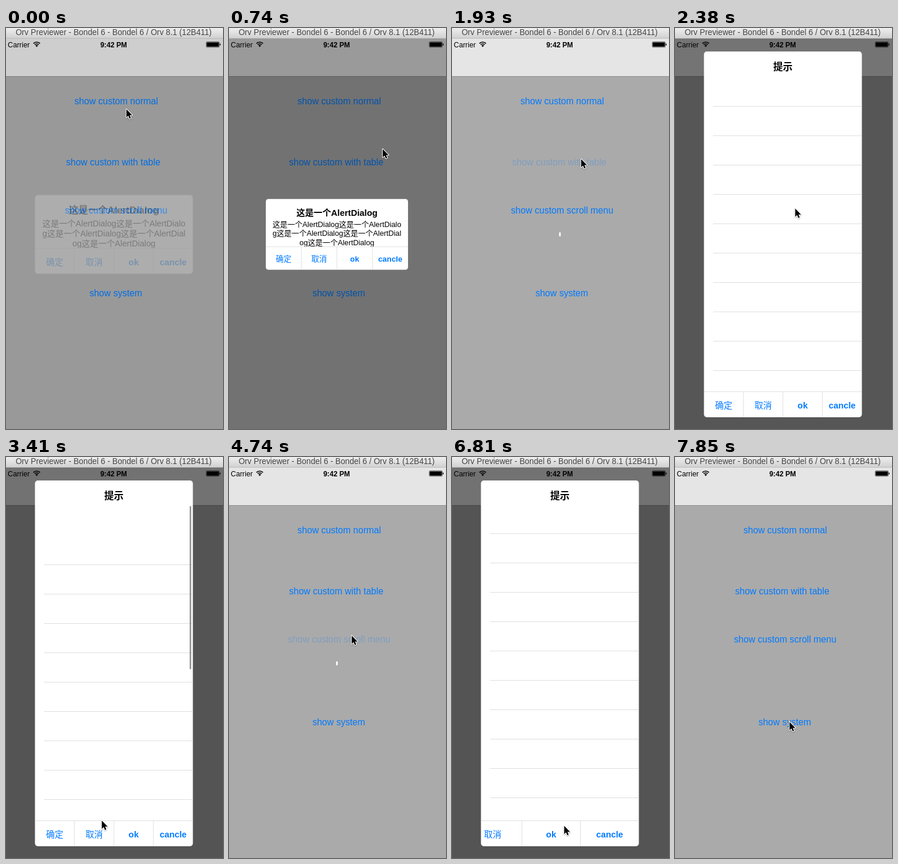
Recreate the animation shown at these times as an HTML page with a canvas. Size 371x683 px, loop 8 s.

```html
<!DOCTYPE html>
<html lang="en">
<head>
<meta charset="utf-8">
<title>Alert dialogs</title>
<style>
  html, body { margin: 0; width: 100%; height: 100%; overflow: hidden; background: #aaa; }
  canvas { display: block; }
</style>
</head>
<body>
<canvas id="stage" width="371" height="683"></canvas>
<script>
const W = 371, H = 683, BAR = 18;
const stage = document.getElementById('stage');
const sheet = Object.assign(document.createElement('canvas'), { width: W, height: H });
const screen2d = stage.getContext('2d'), sheet2d = sheet.getContext('2d');
let ctx = screen2d;

const LOOP = 8000, STEP = LOOP / 54;
const POP = 400, DIM_IN = 450, FADE = 300;
const FONT = '"Liberation Sans", "Noto Sans CJK SC", "Noto Sans CJK", "Noto Sans CJK JP", sans-serif';
const BLUE = '#007aff', LINE = '#dfdfe1';
const CX = 184.5, CY = 351.5, WIDE = 270, ROW = 50, MENU = 43.5;

const buttons = [
  ['show custom normal', 188.5, 130],
  ['show custom with table', 183.3, 234],
  ['show custom scroll menu', 188.3, 316],
  ['show system', 187.7, 457]
];

// scroll: eased [time, offset] keys of the table
const dialogs = [
  { button: 0, open: -2000, close: -240 },
  { button: 0, open: 444, close: 1180 },
  { button: 1, open: 1925, close: 3600, scroll: [[2400, 0], [2800, 180], [3408, -50], [3700, 0]] },
  { button: 2, open: 4740, close: 7000, scroll: [[5300, 0], [5700, 120], [6150, 53]] }
];

const items = ['确定', '取消', 'ok', 'cancle'];
const phrase = '这是一个AlertDialog';
const message = phrase.repeat(5), PER_LINE = 29;

// Places the pointer passes: [time, x, y]
const route = [
  [444, 205, 137], [741, 262, 205], [1925, 220, 222], [2700, 195, 360],
  [3408, 163, 618], [4740, 209, 303], [5700, 205, 400], [6600, 47, 640],
  [6812, 191, 627], [7800, 195, 450]
];

const clamp = v => Math.max(0, Math.min(1, v));
const smooth = p => p * p * (3 - 2 * p);

function at(track, t) {
  const i = track.findIndex(key => key[0] > t);
  if (i <= 0) return track.at(i).slice(1);
  const a = track[i - 1], b = track[i];
  const e = smooth((t - a[0]) / (b[0] - a[0]));
  return a.slice(1).map((v, n) => v + (b[n + 1] - v) * e);
}

function popScale(p) {
  return at([[0, 0.01], [0.5, 1.1], [0.75, 0.9], [1, 1]], p)[0];
}

function rect(color, x, y, w, h) {
  ctx.fillStyle = color;
  ctx.fillRect(x, y, w, h);
}

function round(x, y, w, h, r) {
  ctx.beginPath();
  ctx.roundRect(x, y, w, h, r);
}

function text(str, x, y, size, color = '#000', weight = 'normal', align = 'center') {
  ctx.font = `${weight} ${size}px ${FONT}`;
  ctx.textAlign = align;
  ctx.fillStyle = color;
  ctx.fillText(str, x, y);
}

function drawWifi(x, y) {
  const fan = [-Math.PI * 0.75, -Math.PI * 0.25];
  ctx.strokeStyle = ctx.fillStyle = '#000';
  ctx.lineWidth = 1.7;
  for (const r of [8, 5]) {
    ctx.beginPath();
    ctx.arc(x, y, r, ...fan);
    ctx.stroke();
  }
  ctx.beginPath();
  ctx.moveTo(x, y + 0.5);
  ctx.arc(x, y, 3, ...fan);
  ctx.fill();
}

function drawBattery(x, y) {
  ctx.lineWidth = 0.6;
  round(x, y, 22.4, 9.1, 1.5);
  ctx.stroke();
  round(x + 0.9, y + 0.9, 20.6, 7.3, 0.8);
  ctx.fill();
  round(x + 23.1, y + 2.9, 1.4, 3.3, 0.7);
  ctx.fill();
}

function drawScreen(t) {
  rect('#aaaaaa', 0, 0, W, H);
  rect('#e5e5e5', 0, BAR, W, 64);
  rect('#8e8e8e', 0, 82, W, 1);
  text('Carrier', 3, 32.5, 12.3, '#000', 'normal', 'left');
  text('9:42 PM', 184, 32.5, 12.1, '#000', 'bold');
  drawWifi(52.5, 32);
  drawBattery(342.3, 23.6);

  buttons.forEach(([label, x, y], i) => {
    const pressed = dialogs.some(d => d.button === i && Math.abs(t - d.open) < 150);
    ctx.globalAlpha = pressed ? 0.25 : 1;
    text(label, x, y, 15.6, BLUE);
  });
  ctx.globalAlpha = 1;
}

function drawTitleBar() {
  const shade = ctx.createLinearGradient(0, 0, 0, BAR);
  shade.addColorStop(0, '#eeeeee');
  shade.addColorStop(1, '#d0d0d0');
  rect(shade, 0, 0, W, BAR);
  rect('#bcbcbc', 0, BAR - 1, W, 1);
  text('Orv Previewer - Bondel 6 - Bondel 6 / Orv 8.1 (12B411)', 184, 12, 13.72, '#444');
}

function drawMenu(tall, cell, shift) {
  const left = -WIDE / 2, top = tall / 2 - MENU;
  rect(LINE, left, top - 0.5, WIDE, 1);
  items.forEach((item, i) => {
    const x = left + i * cell - shift;
    if (i) rect(LINE, x - 0.5, top, 1, MENU);
    text(item, x + cell / 2, top + 28.5, 14.8, BLUE, i < 2 ? 500 : 'bold');
  });
}

function drawTable(scroll, t) {
  const top = -268.5, offset = at(scroll, t)[0];
  text('提示', 0, -280, 16.5, '#000', 'bold');

  ctx.save();
  ctx.beginPath();
  ctx.rect(-WIDE / 2, top, WIDE, 536);
  ctx.clip();
  for (let i = 1; i <= 20; i++) {
    rect(LINE, -119.5, top + Math.round(ROW * i - offset), 255, 1);
  }
  const begin = scroll[0][0], end = scroll.at(-1)[0];
  ctx.globalAlpha = t < begin ? 0 : clamp(1 - (t - end) / 400);
  ctx.fillStyle = '#929292';
  round(129.5, top + 0.5 + Math.max(0, offset) * 0.54, 2.6, 278, 1.3);
  ctx.fill();
  ctx.restore();
}

function drawMessage() {
  text(phrase, 0, -35.5, 16.5, '#000', 'bold');
  for (let i = 0; i < 3; i++) {
    text(message.slice(i * PER_LINE, (i + 1) * PER_LINE), 0, -13.7 + i * 17, 14.2);
  }
}

function drawSheet({ button, scroll }, t, scale) {
  const tall = scroll ? 623 : 134, sliding = button === 2;
  ctx.clearRect(0, 0, W, H);
  ctx.save();
  ctx.translate(CX, CY);
  ctx.scale(scale, scale);
  round(-WIDE / 2, -tall / 2, WIDE, tall, 5);
  ctx.fillStyle = '#fff';
  ctx.fill();
  ctx.clip();
  if (scroll) drawTable(scroll, t); else drawMessage();
  if (sliding) drawMenu(tall, 100, 130 * smooth(clamp((t - 6250) / 350)));
  else drawMenu(tall, WIDE / items.length, 0);
  ctx.restore();
}

function drawDialog(d, t) {
  const age = t - d.open, fade = clamp((t - d.close) / FADE);
  if (age < 0 || fade === 1) return;
  ctx = sheet2d;
  drawSheet(d, t, popScale(age / POP));
  ctx = screen2d;
  ctx.globalAlpha = 1 - fade;
  rect(`rgba(0,0,0,${0.5 * clamp(age / DIM_IN)})`, 0, BAR, W, H - BAR);
  ctx.drawImage(sheet, 0, 0);
  ctx.globalAlpha = 1;
}

function drawCursor(x, y) {
  ctx.save();
  ctx.translate(x + 0.8, y + 1.2);
  ctx.beginPath();
  [[0, 0], [0, 14], [3.2, 11], [5.4, 16], [7.7, 15], [5.6, 10.2], [10, 10.2]]
    .forEach(p => ctx.lineTo(...p));
  ctx.closePath();
  ctx.lineWidth = 2.2;
  ctx.lineJoin = 'round';
  ctx.strokeStyle = '#fff';
  ctx.shadowColor = 'rgba(0,0,0,.3)';
  ctx.shadowBlur = 2;
  ctx.shadowOffsetY = 1;
  ctx.stroke();
  ctx.shadowColor = 'transparent';
  ctx.fillStyle = '#000';
  ctx.fill();
  ctx.restore();
}

function frame(now) {
  // The picture advances in 54 even steps per loop.
  const t = Math.floor((now % LOOP + 5) / STEP) % 54 * STEP;
  drawScreen(t);
  for (const d of dialogs) drawDialog(d, t);
  drawTitleBar();
  drawCursor(...at(route, t));
}

const start = performance.now();
function tick() {
  frame(performance.now() - start);
  requestAnimationFrame(tick);
}
tick();
</script>
</body>
</html>
```
